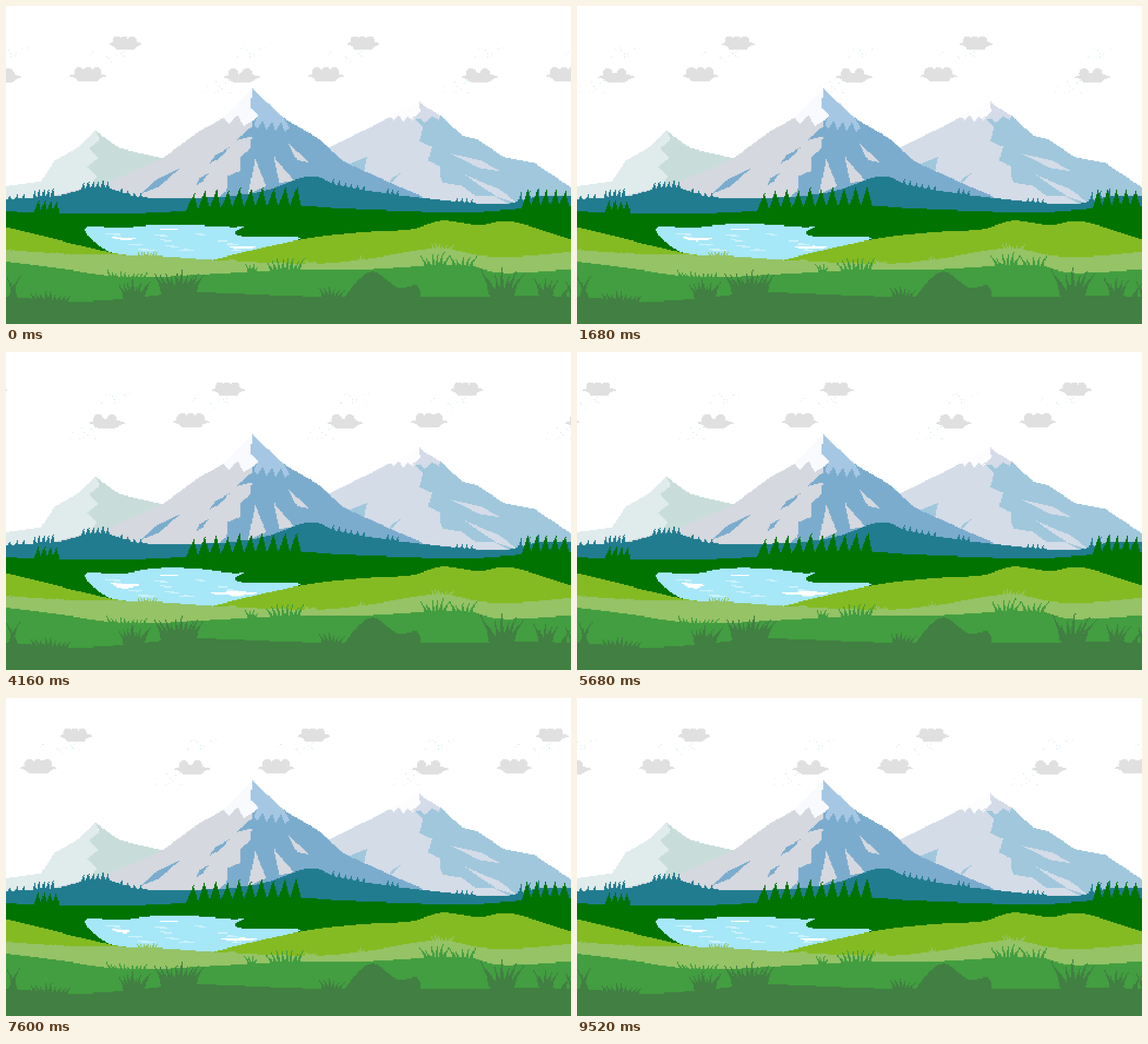
An HTML page with a canvas that plays this animation: 998 by 561 pixels, repeating every 9600 ms.

```html
<!DOCTYPE html>
<html lang="en">
<head>
<meta charset="utf-8">
<title>Mountain meadow</title>
<style>
html, body { margin: 0; width: 100%; height: 100%; overflow: hidden; background: #fff; }
canvas { display: block; width: 998px; height: 561px; image-rendering: pixelated; }
</style>
</head>
<body>
<canvas id="view" width="480" height="270"></canvas>
<script>
const W = 998, H = 561, LOOP = 9600, STEP = 80, TILE = 420.5;
const K = 480 / W, TAU = Math.PI * 2;
const ctx = document.getElementById('view').getContext('2d');

const pairs = list => Array.from({ length: list.length / 2 }, (_, i) => [list[2 * i], list[2 * i + 1]]);
const noise = n => {
  const s = Math.sin(n * 12.9898) * 43758.5453;
  return s - Math.floor(s);
};

// Hard-edged scanline fill; points are in stage units.
function fill(color, pts) {
  ctx.fillStyle = color;
  const p = pts.map(([x, y]) => [x * K, y * K]);
  const ys = p.map(q => q[1]);
  const top = Math.max(0, Math.floor(Math.min(...ys)));
  const end = Math.min(270, Math.ceil(Math.max(...ys)));
  for (let y = top; y < end; y++) {
    const c = y + 0.5, xs = [];
    p.forEach(([ax, ay], i) => {
      const [bx, by] = p[(i + 1) % p.length];
      if ((ay <= c) !== (by <= c)) xs.push(ax + (bx - ax) * (c - ay) / (by - ay));
    });
    xs.sort((a, b) => a - b);
    for (let i = 0; i + 1 < xs.length; i += 2) {
      const l = Math.ceil(xs[i] - 0.5), r = Math.ceil(xs[i + 1] - 0.5);
      ctx.fillRect(l, y, Math.max(1, r - l), 1);
    }
  }
}

const poly = (color, ...list) => fill(color, pairs(list));

function oval(color, cx, cy, rx, ry) {
  fill(color, Array.from({ length: 16 }, (_, i) =>
    [cx + rx * Math.cos(i / 16 * TAU), cy + ry * Math.sin(i / 16 * TAU)]));
}

// Pointed sliver between two ends.
function leaf(color, x1, y1, x2, y2, width) {
  const dx = x2 - x1, dy = y2 - y1, s = width / 2 / Math.hypot(dx, dy);
  const mx = x1 + dx * 0.6, my = y1 + dy * 0.6;
  poly(color, x1, y1, mx - dy * s, my + dx * s, x2, y2, mx + dy * s, my - dx * s);
}

// Jagged line between two ends.
function zigzag(x1, y1, x2, y2, n, amp) {
  const dx = x2 - x1, dy = y2 - y1, len = Math.hypot(dx, dy);
  return Array.from({ length: n + 1 }, (_, i) => {
    const off = i % n ? (i % 2 ? amp : -amp) / len : 0;
    return [x1 + dx * i / n - dy * off, y1 + dy * i / n + dx * off];
  });
}

// Catmull-Rom through key points.
function smooth(pts) {
  const at = i => pts[Math.max(0, Math.min(pts.length - 1, i))];
  const out = [];
  for (let i = 0; i < pts.length - 1; i++) {
    const [a, b, c, d] = [at(i - 1), at(i), at(i + 1), at(i + 2)];
    for (let u = 0; u < 1; u += 0.125) {
      out.push([0, 1].map(k => 0.5 * (2 * b[k] + (c[k] - a[k]) * u +
        (2 * a[k] - 5 * b[k] + 4 * c[k] - d[k]) * u * u +
        (3 * b[k] - a[k] - 3 * c[k] + d[k]) * u * u * u)));
    }
  }
  return [...out, at(pts.length)];
}

// Fills below a smooth line and returns its height at any x.
function hill(color, ...list) {
  const line = smooth(pairs(list)), last = line[line.length - 1];
  fill(color, [...line, [last[0], H], [line[0][0], H]]);
  return x => {
    const i = Math.max(1, line.findIndex(p => p[0] >= x));
    const [[ax, ay], [bx, by]] = [line[i - 1], line[i]];
    return ay + (by - ay) * (x - ax) / (bx - ax);
  };
}

function trees(color, ground, from, to, n, height, width, lean) {
  for (let i = 0; i < n; i++) {
    const x = from + (to - from) * i / (n - 1);
    const h = height * (0.78 + 0.22 * noise(from + i)), base = ground(x) + 3;
    const l = width * 0.58, r = width * 0.42;
    poly(color, x - l, base, x - l * 0.6, base - h * 0.4, x + lean, base - h,
      x + r * 0.6, base - h * 0.4, x + r, base);
  }
}

// A fan of blades; the tips sway and the roots stay.
function grass(color, ground, from, to, n, height, width, sway) {
  for (let i = 0; i < n; i++) {
    const u = i / (n - 1) * 2 - 1;
    const x = (from + to) / 2 + u * (to - from) / 2;
    const h = height * (0.55 + 0.45 * noise(from + i * 3));
    const root = x - u * height * 0.4, base = ground(root) + 3;
    const mid = root + (x - root) * 0.35 + sway * 0.2;
    poly(color, root - width / 2, base, mid - width * 0.3, base - h * 0.5,
      x + sway, base - h, mid + width * 0.3, base - h * 0.5, root + width / 2, base);
  }
}

// x, y and puff positions of each cloud in a tile.
const CLOUDS = [
  { x: 211, y: 67, size: 0.88, puffs: [-17, -3, 13] },
  { x: 144.7, y: 123, size: 1, puffs: [-16, 0, 15] },
  { x: -4, y: 125, size: 1, puffs: [-15, 9] }
];

function cloud({ x, y, size, puffs }, shift) {
  const color = '#e0e0e0', cx = x + shift;
  for (const side of [-1, 1]) {
    const s = side * size;
    poly(color, cx, y - 6, cx + 21 * s, y - 4, cx + 34 * s, y,
      cx + 22 * s, y + 4, cx + 18 * s, y + 9, cx, y + 10);
  }
  for (const p of puffs) oval(color, cx + p * size, y - 6, 9 * size, 9 * size);
}

function specks(x, y, shift) {
  for (let i = 0; i < 11; i++) {
    ctx.fillStyle = i % 3 ? '#eaf2f6' : '#d3edf2';
    ctx.fillRect(Math.round((x + 66 * noise(x + i) + shift) * K),
      Math.round((y + 26 * noise(y + i)) * K), 1, 1);
  }
}

function sky(t) {
  ctx.fillStyle = '#fff';
  ctx.fillRect(0, 0, 480, 270);
  for (let n = -1; n < 3; n++) {
    const shift = t / LOOP * TILE + n * TILE;
    specks(-29, 71, shift);
    specks(146, 78, shift);
    specks(-87, 130, shift);
    for (const c of CLOUDS) cloud(c, shift);
  }
}

function leftMountain() {
  poly('#e0ebec', 0, 318, 62, 309, 86, 273, 130, 248, 158, 220, 210, 345, 0, 345);
  fill('#c8ddd9', [...pairs([158, 220, 200, 251, 282, 270, 270, 320]), ...zigzag(150, 316, 158, 220, 6, 9)]);
}

function rightMountain() {
  const light = '#d4dce8', blue = '#a0c7dc';
  const slope = pairs([768, 194, 805, 228, 832, 235, 880, 267, 935, 278, 998, 320, 998, 360]);
  fill(light, [...pairs([905, 355, 600, 355, 560, 255, 640, 216, 729, 170]), ...slope]);
  fill(blue, [...slope, ...zigzag(890, 350, 773, 312, 4, 5), ...zigzag(768, 304, 722, 200, 6, 8)]);
  fill('#fdfdfe', [...pairs([732, 187, 729, 170]), ...zigzag(677, 195, 718, 202, 5, 5)]);
  fill('#d5dbe8', [...pairs([729, 169, 768, 195]), ...zigzag(764, 201, 716, 200, 4, 5), [732, 187]]);
  leaf(light, 783, 260, 874, 292, 13);
  leaf(light, 810, 298, 906, 350, 14);
  leaf(blue, 696, 296, 676, 312, 6);
  poly(blue, 638, 266, 605, 280, 632, 293);
}

function mainMountain() {
  const light = '#d5d8df', blue = '#7bacce';
  const left = pairs([90, 345, 90, 334, 185, 309, 275, 270, 340, 222, 383, 198, 435, 146]);
  const right = pairs([491, 198, 555, 236, 595, 274, 690, 317, 737, 337, 737, 345]);
  fill(light, [...left, ...right]);
  fill(blue, [[434, 197], ...right, ...zigzag(372, 340, 432, 252, 5, 7), [434, 230], [406, 237], [434, 213]]);
  fill('#f8fafd', [[435, 146], ...zigzag(383, 198, 433, 205, 4, 8), [446, 193], [432, 180]]);
  fill('#a5c7e4', [[435, 146], [491, 198], ...zigzag(501, 215, 437, 208, 8, -8), [446, 193], [432, 180]]);
  poly(light, 440, 270, 428, 332, 460, 318);
  poly(light, 473, 267, 509, 308, 483, 312);
  poly(light, 499, 243, 537, 277, 514, 272);
  leaf(blue, 394, 250, 359, 278, 9);
  leaf(blue, 308, 286, 238, 332, 13);
  leaf(blue, 358, 295, 336, 315, 8);
}

function forest(lean) {
  const teal = '#217c8f', dark = '#007300';
  const ridge = hill(teal, -10, 341, 90, 335, 165, 319, 250, 338, 430, 332, 535, 301,
    600, 320, 740, 339, 870, 350, 940, 336, 1010, 334);
  trees(teal, ridge, 7, 32, 3, 11, 9, 0);
  trees(teal, ridge, 51, 83, 5, 18, 9, 0);
  trees(teal, ridge, 137, 180, 6, 15, 9, 0);
  trees(teal, ridge, 204, 238, 4, 10, 9, 0);
  trees(teal, ridge, 578, 632, 6, 13, 9, 0);
  trees(teal, ridge, 674, 692, 3, 12, 8, 0);
  trees(teal, ridge, 797, 823, 4, 12, 8, 0);
  trees(teal, ridge, 909, 940, 3, 18, 9, 0);
  const edge = hill(dark, -10, 362, 150, 366, 270, 364, 400, 355, 520, 353, 600, 358,
    800, 364, 910, 358, 1010, 352);
  trees(dark, edge, 57, 89, 4, 28, 15, lean);
  trees(dark, edge, 331, 513, 10, 37, 22, lean);
  trees(dark, edge, 921, 987, 5, 37, 20, lean);
}

function lake(t) {
  const wave = Math.cos(t / LOOP * TAU), swell = (1 - wave) / 2, lift = 5 * swell;
  fill('#a6e7f8', smooth(pairs([139, 394, 150, 389, 205, 391, 262, 387 - lift, 330, 387 - lift,
    400, 390, 420, 389, 405, 399, 420, 407, 507, 408, 514, 413, 440, 434, 365, 449,
    250, 445, 190, 437, 150, 411, 139, 394])));
  for (let i = 0; i < 12; i++) {
    const row = Math.floor(i / 3);
    const x = 160 + row * 14 + i % 3 * 82 + 28 * noise(i + 5);
    const y = 399 + row * 10 + 5 * noise(i + 40);
    leaf('#cdf2fb', x, y, x + 24 + 18 * noise(i + 80), y + 5 * noise(i + 9) - 1, 4);
  }
  const end = 236 + 14 * Math.sin(t / LOOP * TAU), fat = 4 * swell;
  poly('#fff', 183, 407, 200, 409, end, 411, 212, 414 + fat, 196, 412 + fat);
  leaf('#fff', 365 + 16 * wave, 426, 450, 426, 5 + fat);
  leaf('#fff', 273, 394, 304, 394, 4);
}

function meadow(a, b) {
  const olive = '#84bb22', pale = '#95c366', mid = '#429e40', deep = '#417f42';
  hill(olive, -10, 387, 60, 405, 188, 436, 250, 442);
  hill(olive, 365, 448, 512, 414, 620, 400, 715, 394, 770, 379, 835, 387, 895, 381, 1010, 417);

  const bank = hill(pale, -10, 430, 110, 438, 260, 441, 380, 449, 540, 455, 640, 446,
    760, 428, 840, 441, 910, 442, 1010, 433);
  oval(pale, 400, 453, 9, 7);
  grass(pale, bank, 232, 268, 7, 11, 5, a / 2);
  grass(pale, bank, 527, 550, 5, 13, 5, a / 2);
  grass(pale, bank, 619, 633, 3, 12, 4, a / 2);
  grass(pale, bank, 751, 791, 7, 13, 5, a / 2);
  grass(pale, bank, 2, 14, 3, 7, 4, a / 2);
  grass(pale, bank, 78, 112, 4, 7, 4, a / 2);

  const field = hill(mid, -10, 450, 100, 464, 180, 476, 250, 479, 360, 473, 520, 465,
    620, 466, 760, 458, 820, 459, 880, 471, 1010, 464);
  grass(mid, field, 178, 249, 10, 14, 6, a);
  grass(mid, field, 423, 445, 4, 18, 6, a);
  grass(mid, field, 460, 526, 8, 25, 7, a);
  grass(mid, field, 732, 784, 6, 28, 7, a);
  grass(mid, field, 783, 831, 5, 25, 7, a);

  const floor = hill(deep, -10, 512, 110, 521, 200, 518, 330, 506, 480, 511, 600, 514,
    850, 514, 910, 511, 1010, 514);
  fill(deep, smooth(pairs([595, 518, 625, 481, 652, 469, 690, 496, 726, 494, 733, 518])));
  grass(deep, floor, 1, 24, 4, 40, 9, b);
  grass(deep, floor, 43, 114, 9, 20, 8, b / 2);
  grass(deep, floor, 199, 254, 8, 36, 11, b);
  grass(deep, floor, 262, 349, 10, 48, 12, b);
  grass(deep, floor, 553, 597, 6, 24, 8, b / 2);
  grass(deep, floor, 838, 914, 7, 56, 11, b);
  grass(deep, floor, 931, 975, 5, 38, 9, b);
  grass(deep, floor, 988, 997, 2, 34, 9, b);
}

function draw(t) {
  const p = t / 600 * TAU;
  const a = 2.5 * Math.sin(p), b = 1.2 + 2.4 * Math.sin(p - 0.45);
  sky(t);
  leftMountain();
  rightMountain();
  mainMountain();
  forest(1 + a * 0.7);
  lake(t);
  meadow(a, b);
}

const start = performance.now();
let shown = -1;

function tick(now) {
  const step = Math.floor(Math.max(0, now - start) % LOOP / STEP);
  if (step !== shown) draw((shown = step) * STEP);
  requestAnimationFrame(tick);
}

tick(start);
</script>
</body>
</html>
```
